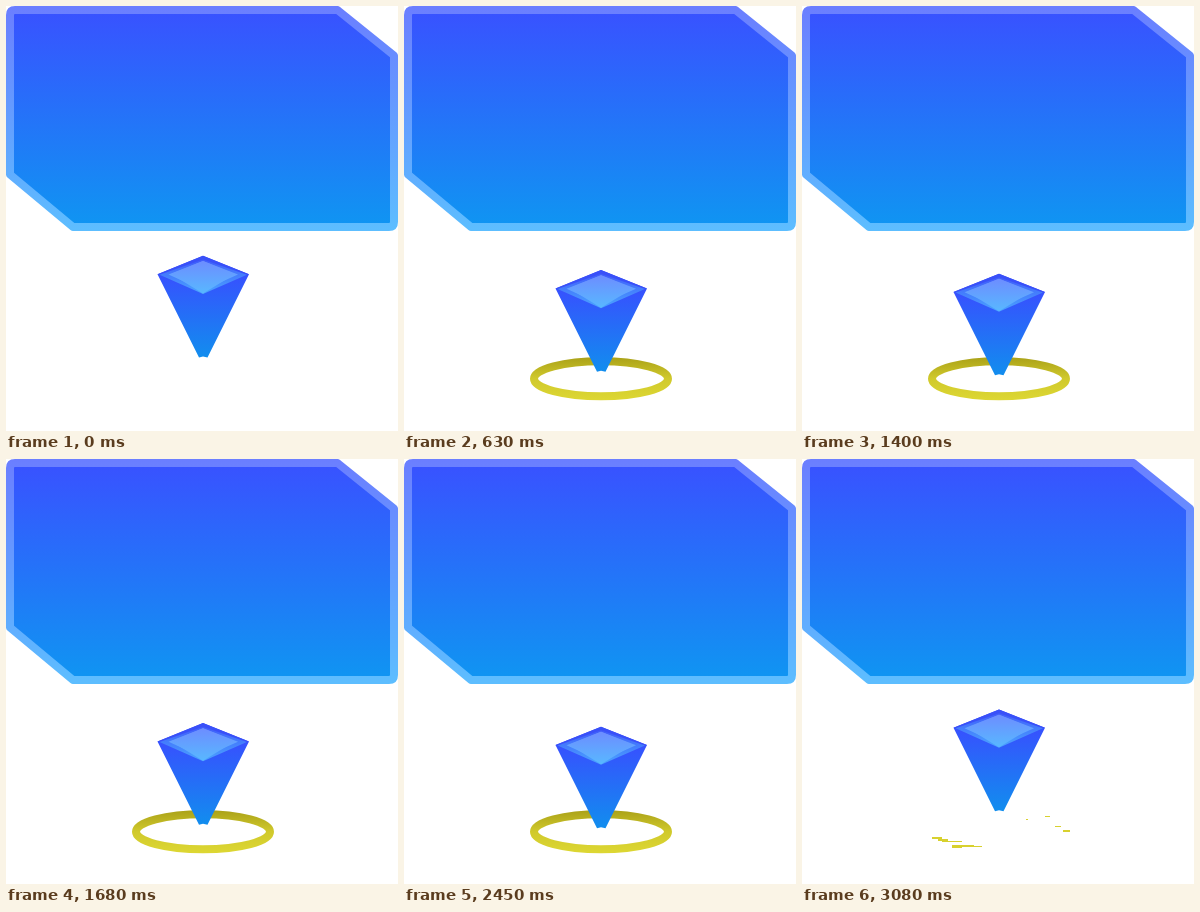
An HTML page for the animation above (3.15 s loop, 392 px wide and 425 px high).

```html
<!DOCTYPE html>
<html lang="en">
<head>
<meta charset="utf-8">
<title>Map pin</title>
<style>
  html, body { margin: 0; width: 100%; height: 100%; overflow: hidden; background: #fff; }
  svg { display: block; width: 392px; height: 425px; }
</style>
</head>
<body>
<svg viewBox="0 0 392 425">
  <defs>
    <linearGradient id="panelFill" gradientUnits="userSpaceOnUse" x1="0" y1="8" x2="0" y2="217">
      <stop offset="0" stop-color="#3853ff"/><stop offset="1" stop-color="#1094f2"/>
    </linearGradient>
    <linearGradient id="panelEdge" gradientUnits="userSpaceOnUse" x1="0" y1="0" x2="0" y2="225">
      <stop offset="0" stop-color="#6b7eff"/><stop offset="1" stop-color="#5dbeff"/>
    </linearGradient>
    <linearGradient id="body" gradientUnits="userSpaceOnUse" x1="0" y1="266" x2="0" y2="352">
      <stop offset="0" stop-color="#384fff"/><stop offset="1" stop-color="#118eee"/>
    </linearGradient>
    <linearGradient id="rim" x1="0" y1="0" x2="0" y2="1">
      <stop offset="0" stop-color="#3f5cfa"/><stop offset="1" stop-color="#4aa6ff"/>
    </linearGradient>
    <linearGradient id="face" x1="0" y1="0" x2="0" y2="1">
      <stop offset="0" stop-color="#6d8dff"/><stop offset="1" stop-color="#58b8ff"/>
    </linearGradient>
    <linearGradient id="gold" gradientUnits="userSpaceOnUse" x1="0" y1="351" x2="0" y2="394">
      <stop offset="0" stop-color="#aaa118"/><stop offset=".5" stop-color="#d0c92c"/>
      <stop offset="1" stop-color="#ddd733"/>
    </linearGradient>
  </defs>

  <path d="M9 4H331.5L388 49.5V216Q388 221 383 221H67L4 168.500V9Q4 4 9 4Z"
        fill="url(#panelFill)" stroke="url(#panelEdge)" stroke-width="8" stroke-linejoin="round"/>

  <ellipse id="ring" cx="197" cy="372.700" rx="67" ry="17.500"
           fill="none" stroke="url(#gold)" stroke-width="8"/>
  <path id="specks" fill="#d8d12f" shape-rendering="crispEdges"
        d="M130 378h10v2h-10zM136 380h10v2h-10zM140 382h20v1h-20zM150 386h22v1h-22zM150 387h30v1h-30zM150 388h10v1h-10zM224 360h2v1h-2zM243 357h5v1h-5zM253 367h6v1h-6zM261 371h7v2h-7z"/>

  <g id="pin">
    <path d="M151.500 268.200L197 249.800L243 268.200L201.500 351.500L197 350.500L193 351.500Z" fill="url(#body)"/>
    <path d="M197 249.800L243 268.200L197 288L151.500 268.200Z" fill="#3950f8"/>
    <path d="M197 253.500L241 268.700L197 288L153.500 268.700Z" fill="url(#rim)"/>
    <path d="M197 255L232 268.500L197 284L162.500 268.500Z" fill="url(#face)"/>
    <path d="M197 255L229 268L197 287.500L165 268Z" fill="url(#face)"/>
  </g>
</svg>
<script>
  const STEP = 70, BEAT = 1050, LOW = 420, DROP = 19.3;
  const RING_ON = 210, RING_OFF = 980;
  const pin = document.getElementById('pin');
  const ring = document.getElementById('ring');
  const specks = document.getElementById('specks');

  const smooth = t => t * t * (3 - 2 * t);
  const show = (el, on) => el.setAttribute('visibility', on ? 'visible' : 'hidden');

  function draw(ms) {
    const t = Math.floor(ms / STEP) * STEP % BEAT;
    // quick fall, slower rise
    const fall = t < LOW ? t / LOW : (BEAT - t) / (BEAT - LOW);
    pin.setAttribute('transform', `translate(0 ${(DROP * smooth(fall)).toFixed(2)})`);
    show(ring, t >= RING_ON && t < RING_OFF);
    show(specks, t >= RING_OFF);
  }

  const start = performance.now();
  function tick() {
    draw(performance.now() - start);
    requestAnimationFrame(tick);
  }
  tick();
</script>
</body>
</html>
```
